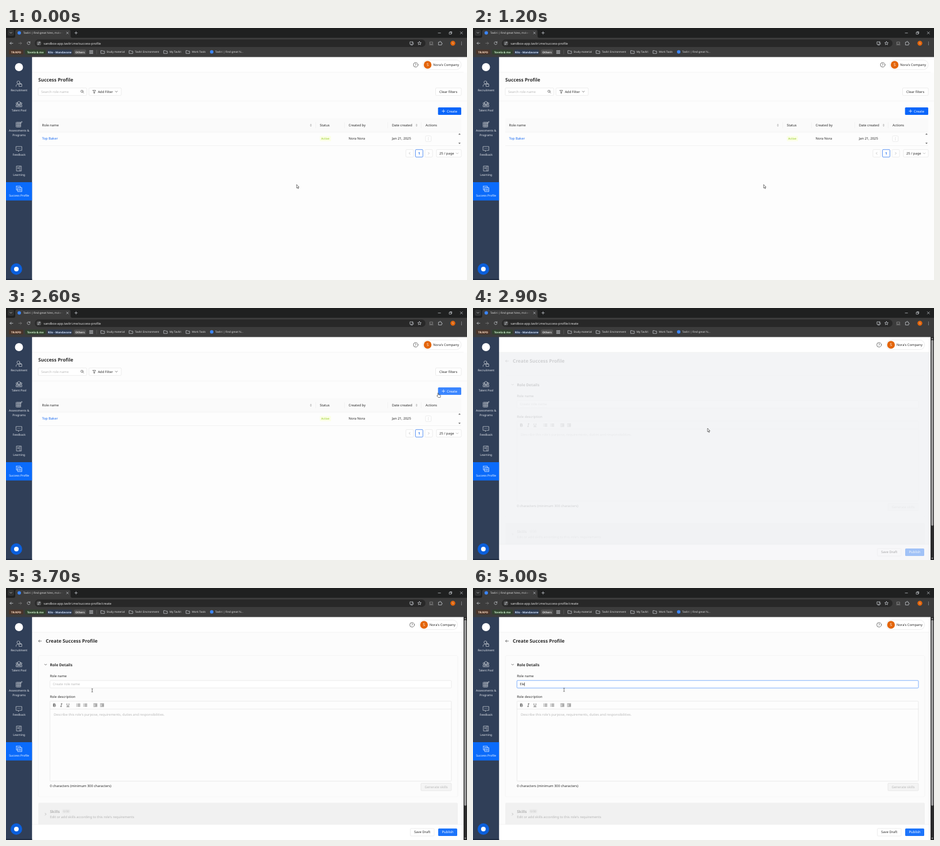
An HTML page that plays this animation: 800 by 438 pixels, repeating every 5100 ms.

```html
<!DOCTYPE html>
<html lang="en">
<head>
<meta charset="utf-8">
<title>Success Profile</title>
<style>
html, body { margin: 0; height: 100%; overflow: hidden; background: #fff; }
svg { display: block; width: 800px; height: 438px; }
text { font: 5.83px "Noto Sans", sans-serif; fill: #2b2b2b; text-rendering: geometricPrecision; white-space: pre; }
.chrome text { font-size: 4.65px; fill: #e3e3e3; }
.chrome .url { font-size: 5.5px; }
.chrome .chip { font-weight: 600; font-size: 4.75px; text-anchor: middle; }
.side text { font-size: 5px; fill: #e6e9ef; text-anchor: middle; }
.line { fill: none; stroke: #d5d8de; stroke-width: .7; stroke-linecap: round; stroke-linejoin: round; }
.box { fill: #fff; stroke: #d9d9d9; stroke-width: .5; }
.rule { stroke: #ececec; stroke-width: .6; }
.dark { stroke: #444; }
.dim { stroke: #aaa; }
text.title { font-size: 8.25px; font-weight: 600; }
text.sub { font-size: 6.6px; font-weight: 600; }
text.med { font-weight: 500; }
text.hint { fill: #b9b9b9; }
text.white { fill: #fff; font-weight: 500; }
text.mid { text-anchor: middle; }
</style>
</head>
<body>
<svg viewBox="0 0 800 438">
  <defs>
    <linearGradient id="fade" gradientUnits="userSpaceOnUse" x1="86" x2="100">
      <stop stop-color="#e3e3e3"/><stop offset="1" stop-color="#3c3c3c"/>
    </linearGradient>
    <path id="folder" d="M-3-2.2h2.3l.9.9h2.8v4h-6z"/>
    <path id="down" d="M-1.8-.9 0 .9 1.8-.9"/>
    <path id="sort" fill="#b5b5b5" d="M-1.6-.5h3.2L0-2.5zM-1.6.6h3.2L0 2.6z"/>
    <path id="list" d="M-1-2h4M-1 0h4M-1 2h4M-3-2h.3M-3 0h.3M-3 2h.3"/>
    <path id="indent" d="M-3-2.3h6M0-.7h3M0 .8h3M-3 2.4h6M-3 0h1.6"/>
  </defs>

  <rect width="800" height="438" fill="#fff"/>

  <g id="listPage">
    <path fill="#fdfdfd" d="M45 77h755v361H45z"/>
    <text class="title" x="56" y="92.7">Success Profile</text>
    <rect class="box" x="56" y="104.2" width="84" height="13" rx="1.5"/>
    <text class="hint" x="61" y="112.7">Search role name</text>
    <g class="line dark"><circle cx="131.8" cy="110" r="1.9"/><path d="m133.3 111.5 1.6 1.6"/></g>
    <rect class="box" x="144" y="104.2" width="56" height="13" rx="1.5"/>
    <path class="line dark" d="M150.8 108.3h4.8l-1.7 2.6v2.4h-1.4v-2.4z"/>
    <text x="159.4" y="112.7">Add Filter</text>
    <use href="#down" class="line dark" x="191.5" y="110.7"/>
    <rect class="box" x="745.5" y="104.2" width="44.5" height="13" rx="1.5"/>
    <text class="mid" x="767.7" y="112.7">Clear filters</text>
    <path class="rule" d="M45 127h755"/>
    <rect id="create" x="749.7" y="138" width="40.3" height="13" rx="1.5"/>
    <path class="line" style="stroke:#fff" d="M756.7 144.5h5M759.2 142v5"/>
    <text class="white" x="765" y="146.6">Create</text>

    <path fill="#fafafa" d="M56 157h734v24H56z"/>
    <path class="rule" d="M537.5 164v10M587.5 164v10M662.5 164v10M720.5 164v10M56 181h734M56 204.5h734"/>
    <text class="med" x="62.5" y="171.1">Role name</text>
    <text class="med" x="544.5" y="171.1">Status</text>
    <text class="med" x="594.5" y="171.1">Created by</text>
    <text class="med" x="669.7" y="171.1">Date created</text>
    <text class="med" x="728" y="171.1">Actions</text>
    <use href="#sort" x="529" y="169"/><use href="#sort" x="712.5" y="169"/>
    <text x="62.5" y="194.4" style="fill:#1668f0">Top Baker</text>
    <rect x="544.7" y="187.8" width="19.3" height="9" rx="1" fill="#fbffe6"/>
    <text x="547" y="194.1" style="font-size:5px;fill:#8fc71a">Active</text>
    <text x="594.5" y="194.4">Nora Nora</text>
    <text x="669.7" y="194.4">Jan 21, 2025</text>
    <rect class="box" x="728" y="187.5" width="9.8" height="9.8" rx="1.5"/>
    <path class="line dim" d="M732.9 190.4v.1M732.9 192.4v.1M732.9 194.4v.1"/>
    <path fill="#555" d="M785 185.3h4l-2-2zM785 199.5h4l-2 2z"/>

    <rect class="box" x="694" y="211.3" width="13" height="13" rx="1.5"/>
    <rect class="box" x="710.5" y="211.3" width="13" height="13" rx="1.5" style="stroke:#1668f0;stroke-width:.7"/>
    <rect class="box" x="727" y="211.3" width="13" height="13" rx="1.5"/>
    <path class="line dim" d="m701.3 216-1.8 1.8 1.8 1.8M732.7 216l1.8 1.8-1.8 1.8"/>
    <text class="mid" x="717" y="219.9" style="fill:#1668f0;font-weight:600">1</text>
    <rect class="box" x="747" y="211.3" width="43" height="13" rx="1.5"/>
    <text x="752" y="219.9">25 / page</text>
    <use href="#down" class="line dim" x="783" y="217.9"/>
  </g>

  <g id="formPage">
    <path fill="#fcfcfc" d="M45 77h749v361H45z"/>
    <path class="line dark" d="M61.5 92.2h-5m2-2-2 2 2 2"/>
    <text class="title" x="69" y="95.2">Create Success Profile</text>
    <rect class="box" x="56" y="117.5" width="728" height="245.5" rx="2" style="fill:#fcfcfc;stroke:#efefef"/>
    <use href="#down" class="line dark" x="68.7" y="133.2"/>
    <text class="sub" x="76.2" y="135.6">Role Details</text>
    <text x="76.2" y="155">Role name</text>
    <rect id="halo" x="75.6" y="160.1" width="698" height="14.4" rx="2" fill="#cfe2ff"/>
    <rect id="field" class="box" x="76.3" y="160.8" width="696.6" height="13" rx="1.5"/>
    <text id="entry" x="81.2" y="169.3"></text>
    <path id="caret" stroke="#222" stroke-width=".6" d="M0 164v6.6"/>
    <text x="76.2" y="190.7">Role description</text>
    <rect class="box" x="76.3" y="196.7" width="696.6" height="139" rx="1" style="fill:#fdfdfd"/>
    <path d="M76.3 210.4h696.6" stroke="#d9d9d9" stroke-width=".5"/>
    <g class="line dark">
      <path d="M82.7 201.2h1.6a1.1 1.1 0 0 1 0 2.3h-1.6zM82.7 203.5h2a1.2 1.2 0 0 1 0 2.4h-2z" stroke-width="1"/>
      <path d="M95.5 201.2h2M94.5 206h2M96.5 201.2l-1 4.8M105.8 201v2.3a1.7 1.7 0 0 0 3.4 0V201M105.3 206.4h4.4"/>
      <use href="#list" x="125.5" y="203.6"/><use href="#list" x="137.5" y="203.6"/>
      <use href="#indent" x="155" y="203.6"/><use href="#indent" x="166.7" y="203.6"/>
    </g>
    <text class="hint" x="83" y="222.3">Describe this role's purpose, requirements, duties and responsibilities.</text>
    <text x="76.2" y="346">0 characters (minimum 300 characters)</text>
    <rect class="box" x="720" y="339.3" width="53" height="13" rx="1.5" style="fill:#f4f4f4"/>
    <text class="hint mid" x="746.5" y="347.7">Generate skills</text>
    <rect x="56" y="373.3" width="728" height="40" rx="2" fill="#f1f1f1"/>
    <path class="line dim" d="m67.8 391.3 1.8 1.8-1.8 1.8"/>
    <text class="sub" x="76.2" y="390.8" style="fill:#b4b4b4">Skills</text>
    <rect x="97.5" y="384.5" width="14" height="7.6" rx="2" fill="#ececec"/>
    <text class="mid" x="104.5" y="390" style="font-size:5px;fill:#c0c0c0">0/30</text>
    <text x="76.2" y="400" style="fill:#b4b4b4">Edit or add skills according to this role's requirements</text>
    <path id="veil" fill="#f2f3f6" d="M45 77h749v334H45z"/>
    <path fill="#fff" d="M45 411h749v27H45z"/>
    <path class="rule" d="M45 411h749"/>
    <rect class="box" x="701.7" y="418" width="41.3" height="13" rx="1.5"/>
    <text class="mid" x="722.3" y="426.4">Save Draft</text>
    <rect x="750" y="418" width="33" height="13" rx="1.5" fill="#1c74fb"/>
    <text class="white mid" x="766.5" y="426.4">Publish</text>
    <path id="footVeil" fill="#f2f3f6" d="M45 411h749v27H45z"/>
    <path fill="#2b2b2b" d="M794 50h6v388h-6z"/>
    <rect x="795.2" y="55.5" width="3.7" height="323" rx="1.8" fill="#9c9c9c"/>
    <path fill="#9c9c9c" d="M795.3 54h3.4l-1.7-2.2zM795.3 434h3.4l-1.7 2.2z"/>
  </g>

  <path class="rule" d="M45 77h749"/>
  <g id="account">
    <circle class="line dark" cx="711" cy="64" r="4"/>
    <text class="mid" x="711" y="66">?</text>
    <rect class="box" x="723.3" y="55.7" width="66.7" height="16.6" rx="8.3"/>
    <circle cx="731.7" cy="64" r="6.7" fill="#e3650b"/>
    <text class="white mid" x="731.7" y="66.3" style="font-size:6.5px">S</text>
    <text x="741.2" y="66.1">Nora's Company</text>
  </g>

  <g class="side">
    <path fill="#303f58" d="M0 50h45.2v388H0z"/>
    <path fill="#0b6bfb" d="M0 268h45.2v31.7H0z"/>
    <path fill="#1f2b41" d="M0 436h45.2v2H0z"/>
    <circle cx="22.5" cy="68" r="7" fill="#fff"/>
    <g class="line">
      <circle cx="21.5" cy="94.5" r="2.5"/><path d="M17.5 101.5v-1.3q0-2.4 4-2.4M23 97.5h4.5v4H23zM24.3 97.5v-1h2v1"/>
      <circle cx="22.5" cy="130" r="2.4"/><circle cx="18.8" cy="131" r="1.3"/><circle cx="26.2" cy="131" r="1.3"/><path d="M17.5 136.5v-3h10v3zM20.2 136.5v-1.8h4.6v1.8"/>
      <path d="M18 164h7.5v8H18zM18 166.7h7.5M18 169.4h7.5M20.5 164v8M23 164v8M24.5 165l2.8-2.8.9.9-2.7 2.8"/>
      <path d="M17.7 206h9.8v6.7h-4l-2 2v-2h-3.8zM20.2 209.4h.2M22.5 209.4h.2M24.8 209.4h.2"/>
      <path d="M18.5 240h5.7v8.5h-5.7zM24.2 240h2.5v8.5h-2.5M20 242.5h2.6M20 244.5h2.6"/>
      <path d="M18 275h7v2.5M18 275v6.5h2.5M20.5 277.5h7v6.8h-7zM22 280h4M22 282h4" stroke="#fff"/>
    </g>
    <text x="22.7" y="109.6">Recruitment</text>
    <text x="22.7" y="144.8">Talent Pool</text>
    <text x="22.7" y="179.8">Assessments &amp;</text>
    <text x="22.7" y="187.6">Programs</text>
    <text x="22.7" y="222.4">Feedback</text>
    <text x="22.7" y="257.4">Learning</text>
    <text x="22.7" y="292.6" style="fill:#fff;font-weight:500">Success Profile</text>
    <circle cx="18" cy="419" r="10" fill="#0b5fdc"/>
    <circle cx="18" cy="419" r="4" fill="#fff"/>
  </g>

  <g class="chrome">
    <path fill="#1f2020" d="M0 0h800v18H0z"/>
    <path fill="#3c3c3c" d="M0 17h800v33.5H0zM13 17q3 0 3-3V6q0-3 3-3h90q3 0 3 3v8q0 3 3 3z"/>
    <rect x="3" y="2.7" width="11" height="11" rx="3" fill="#323333"/>
    <use href="#down" class="line" x="8.5" y="8.3"/>
    <circle cx="23" cy="8.5" r="3" fill="#3c85f5"/>
    <text x="30" y="10.3" style="fill:url(#fade)">Tavliri | Find great hires, make t</text>
    <path class="line" d="m105 7 3.2 3.2m0-3.2-3.2 3.2M119.3 8.5h4.6M121.6 6.2v4.6M750 8.7h4.2M769.5 7.5h3.2v3.2h-3.2zM770.5 7.3v-.9h3.2v3.2h-.8M788.4 6.6l3.8 3.8m0-3.8-3.8 3.8"/>
    <rect x="50" y="20" width="678" height="13" rx="6.5" fill="#282828"/>
    <circle cx="57" cy="26.5" r="4.8" fill="#3c3c3c"/>
    <g class="line">
      <path d="M12 26.5H7m2.2-2.2L7 26.5l2.2 2.2M41.5 25a2.5 2.5 0 1 0 .3 2M41.7 23.7v1.6h-1.6"/>
      <path stroke="#858585" d="M22 26.5h5m-2.2-2.2 2.2 2.2-2.2 2.2"/>
      <path d="M54.8 25.1h2M58 28h1.5"/><circle cx="58.3" cy="25.1" r=".9"/><circle cx="55.7" cy="28" r=".9"/>
      <path d="M705 24h-4v4.3h6v-1.5M702.6 29.7h3M705.8 23.5v3m-1.2-1.1 1.2 1.2 1.2-1.2"/>
      <path d="m717.5 23.4.9 2 2.1.2-1.6 1.5.5 2.1-1.9-1.1-1.9 1.1.5-2.1-1.6-1.5 2.1-.2z"/>
      <path stroke="#999" d="M735.8 24.4h4.6v3.5h-4.6zM735 29.2h6.2"/>
      <path d="M750.8 24.7h1.7q0-1.6 1-1.6t1 1.6h1.3v1.6q1.4 0 1.4.9t-1.4 1v1.3h-5z"/>
      <path stroke-width="1.1" d="M790.5 24.2v.1M790.5 26.5v.1M790.5 28.8v.1"/>
    </g>
    <text class="url" x="65.3" y="28.5">sandbox-app.tavliri.me/success-profile<tspan id="path"></tspan></text>
    <circle cx="775.5" cy="26.5" r="4.2" fill="#e3650b"/>
    <text class="mid" x="775.5" y="28.1">S</text>

    <rect x="5" y="37.5" width="25" height="8.6" rx="2" fill="#49352a"/>
    <text class="chip" x="17.5" y="43.5" style="fill:#ffdcc2">TR/KPD</text>
    <rect x="33" y="37.5" width="36" height="8.6" rx="2" fill="#31432f"/>
    <text class="chip" x="51" y="43.5" style="fill:#cdf0cc">Tovela &amp; me</text>
    <rect x="72" y="37.5" width="42.5" height="8.6" rx="2" fill="#2d3b51"/>
    <text class="chip" x="93.2" y="43.5" style="fill:#d3e3fd">Rilo - Mandavane</text>
    <rect x="118" y="37.5" width="21" height="8.6" rx="2" fill="#505050"/>
    <text class="chip" x="128.5" y="43.5">Others</text>
    <path class="line" d="M145.5 39.2h1.8V41h-1.8zM148.9 39.2h1.8V41h-1.8zM145.5 42.6h1.8v1.8h-1.8zM148.9 42.6h1.8v1.8h-1.8z"/>
    <path stroke="#666" stroke-width=".6" d="M157.5 38v7.5"/>
    <g class="line">
      <use href="#folder" x="168" y="41.5"/><use href="#folder" x="217" y="41.5"/>
      <use href="#folder" x="277" y="41.5"/><use href="#folder" x="315.7" y="41.5"/>
    </g>
    <text x="174.5" y="43.4">Study material</text>
    <text x="223.7" y="43.4">Tavliri Environment</text>
    <text x="283.7" y="43.4">My Tavliri</text>
    <text x="322.5" y="43.4">Work Tools</text>
    <circle cx="357" cy="41.5" r="3" fill="#3c85f5"/>
    <text x="363" y="43.4">Tavliri | Find great hi...</text>
  </g>

  <g id="pointer" stroke="#222" stroke-width=".6" stroke-linejoin="round">
    <path id="arrow" fill="#fff" d="M0 0v6.2l1.4-1.2 1 2.3 1-.4-1-2.3h1.9z"/>
    <path id="hand" fill="#fff" d="M-.7 5V.6q.7-1 1.4 0V3l3 .7q.8.3.6 1.2l-.6 3H.2l-2.4-2.7q.2-1 1.5-.2z"/>
    <path id="beam" fill="none" d="M-1.3-3Q0-3 0-2.3Q0-3 1.3-3M0-2.3v4.6M-1.3 3Q0 3 0 2.3Q0 3 1.3 3"/>
  </g>
</svg>
<script>
const LOOP = 5100, STEP = 100, OPEN = 2700, FOCUS = 3800;
const $ = id => document.getElementById(id);
const show = (id, on) => $(id).style.display = on ? '' : 'none';
const set = (id, name, value) => $(id).setAttribute(name, value);

// time, x, y
const route = [
  [0, 504.3, 272], [1300, 504.3, 272], [2100, 712, 147], [2400, 764, 144], [2550, 764, 144],
  [2900, 407, 209], [3300, 77, 191], [3800, 158, 177], [LOOP, 158, 177]
];
const keystrokes = [[4400, 'E'], [4600, 'El'], [4900, 'Ele']];

// Speed through a waypoint; zero where the pointer rests or turns back.
function speed(i, axis) {
  if (!route[i - 1] || !route[i + 1]) return 0;
  const [a, b, c] = route.slice(i - 1, i + 2);
  const before = (b[axis] - a[axis]) / (b[0] - a[0]);
  const after = (c[axis] - b[axis]) / (c[0] - b[0]);
  return before * after > 0 ? 2 * before * after / (before + after) : 0;
}

function pointerAt(t) {
  const i = route.findIndex(p => p[0] > t);
  const from = route[i - 1], to = route[i], span = to[0] - from[0];
  const k = (t - from[0]) / span, ease = k * k * (3 - 2 * k);
  return [1, 2].map(axis => from[axis] + (to[axis] - from[axis]) * ease
    + span * k * (1 - k) * ((1 - k) * speed(i - 1, axis) - k * speed(i, axis)));
}

function smooth(from, to, t) {
  const k = Math.min(1, Math.max(0, (t - from) / (to - from)));
  return k * k * (3 - 2 * k);
}

function draw(t) {
  const form = t >= OPEN, focused = t >= FOCUS;
  show('listPage', !form);
  show('formPage', form);
  set('account', 'transform', form ? 'translate(-6.3)' : '');
  $('path').textContent = form ? '/create' : '';

  const veil = 1 - smooth(2740, 3340, t);
  set('veil', 'opacity', veil);
  set('footVeil', 'opacity', veil * .75);

  const typed = keystrokes.filter(k => k[0] <= t).pop()?.[1] || '';
  const entry = $('entry');
  entry.textContent = typed || 'Create role name';
  entry.setAttribute('class', typed ? '' : 'hint');
  show('halo', focused);
  $('field').style.stroke = focused ? '#2f7df6' : '';
  show('caret', focused && (typed || (t - FOCUS) % 1000 < 500));
  set('caret', 'transform', `translate(${81.4 + (typed ? entry.getComputedTextLength() : 0)})`);

  const [x, y] = pointerAt(t);
  const hover = !form && x > 749;
  const beam = t > 3300 && y < 182;
  set('create', 'fill', hover ? '#3b86ff' : '#0b66fa');
  set('pointer', 'transform', `translate(${x} ${y})`);
  show('arrow', !hover && !beam);
  show('hand', hover);
  show('beam', beam);
}

function tick() {
  draw(Math.floor(performance.now() % LOOP / STEP) * STEP);
  requestAnimationFrame(tick);
}
tick();
</script>
</body>
</html>
```
